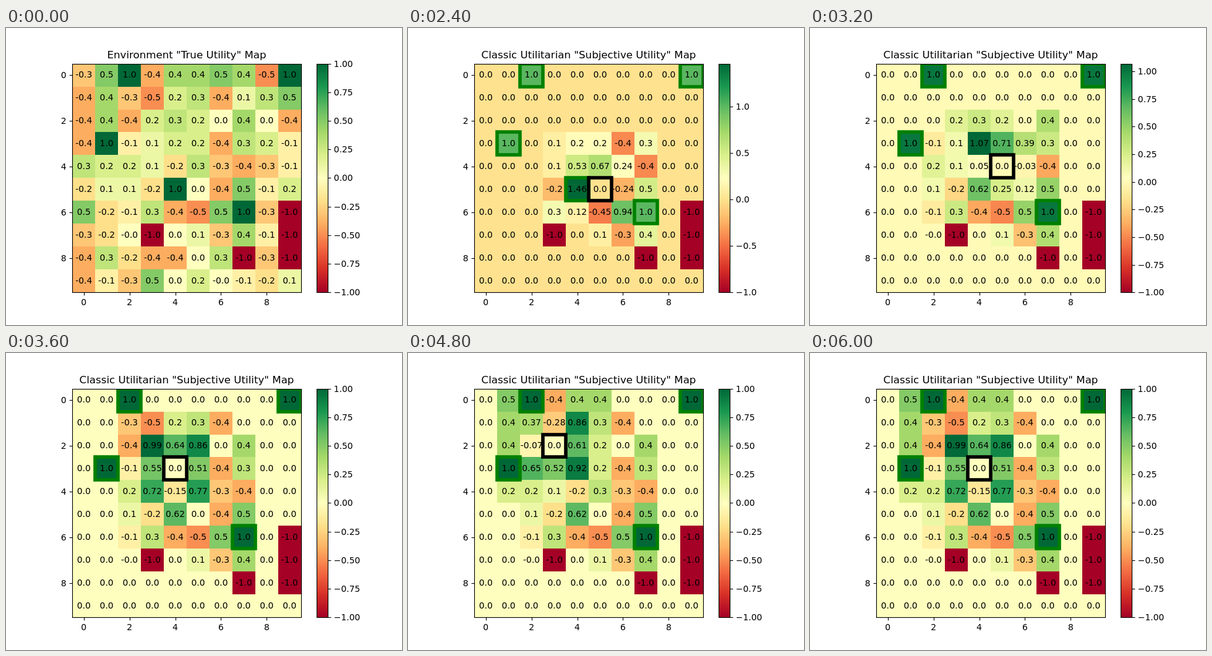
Recreate the animation shown at these times as an HTML page with a canvas. Size 640 px wide and 480 px high, loop 6.4 s.

```html
<!DOCTYPE html>
<html lang="en">
<head>
<meta charset="utf-8">
<title>Utility map</title>
<style>
  html, body { margin: 0; width: 100%; height: 100%; overflow: hidden; background: #fff; }
  canvas { display: block; }
</style>
</head>
<body>
<canvas id="stage" width="640" height="480"></canvas>
<script>
const ctx = document.getElementById('stage').getContext('2d');
const LEFT = 107.2, TOP = 57.6, SIZE = 369.6, CELL = SIZE / 10;
const BAR_LEFT = 502, BAR_RIGHT = 520;
const INTRO = 2000, STEP = 400, LOOP = 6400;

// Utility of every cell, in tenths
const truth = `
  -3 5 10 -4 4 4 5 4 -5 10
  -4 4 -3 -5 2 3 -4 1 3 5
  -4 4 -4 2 3 2 0 4 0 -4
  -4 10 -1 1 2 2 -4 3 2 -1
  3 2 2 1 -2 3 -3 -4 -3 -1
  -2 1 1 -2 10 0 -4 5 -1 2
  5 -2 -1 3 -4 -5 5 10 -3 -10
  -3 -2 -0 -10 0 1 -3 4 -1 -10
  -4 3 -2 -4 -4 0 3 -10 -3 -10
  -4 -1 -3 5 0 2 -0 -1 -2 1`.trim().split('\n')
  .map(line => line.trim().split(' ').map(n => Number(n) / 10));

// Agent position and the worth of its eight neighbours, row by row
const start = { row: 5, col: 5, worth: [] };
const think = { row: 5, col: 5, worth: [.53, .67, .24, 1.46, -.24, .12, -.45, .94] };
const eat = { row: 5, col: 4, worth: [.9, .25, 1.03, .15, .27, .8, -.25, -.08] };
const climb = { row: 4, col: 5, worth: [1.07, .71, .39, .05, -.03, .62, .25, .12] };
const low = { row: 3, col: 4, worth: [.99, .64, .86, .55, .51, .72, -.15, .77] };
const high = { row: 2, col: 3, worth: [.37, -.28, .86, -.07, .61, .65, .52, .92] };
const path = [start, think, eat, climb, low, high, low, high, low, high, low];
const EATEN = { row: 5, col: 4, rest: .62, since: path.indexOf(eat) };

const stops = 'a50026 d73027 f46d43 fdae61 fee08b ffffbf d9ef8b a6d96a 66bd63 1a9850 006837'
  .split(' ').map(hex => [0, 2, 4].map(i => parseInt(hex.slice(i, i + 2), 16)));

function colour(t) {
  const level = Math.max(0, Math.min(255, Math.floor(t * 256))) / 255 * 10;
  const i = Math.min(9, Math.floor(level));
  const mix = stops[i].map((c, k) => Math.round(c + (stops[i + 1][k] - c) * (level - i)));
  return `rgb(${mix})`;
}

const edgeX = col => Math.round(LEFT + CELL * col);
const edgeY = row => Math.round(TOP + CELL * row);
const near = (cell, row, col, reach) =>
  Math.abs(cell.row - row) <= reach && Math.abs(cell.col - col) <= reach;

function format(v) {
  const hundredths = Math.round(v * 100);
  const sign = Object.is(v, -0) ? '-' : '';
  return sign + v.toFixed(hundredths % 10 ? 2 : 1);
}

function valuesAt(index) {
  const seen = path.slice(0, index + 1), agent = path[index];
  const values = truth.map((line, row) => line.map((v, col) =>
    Math.abs(v) === 1 || seen.some(p => near(p, row, col, 2)) ? v : 0));
  if (index >= EATEN.since) values[EATEN.row][EATEN.col] = EATEN.rest;
  agent.worth.forEach((v, i) => {
    const k = i < 4 ? i : i + 1;
    values[agent.row + Math.floor(k / 3) - 1][agent.col + k % 3 - 1] = v;
  });
  values[agent.row][agent.col] = 0;
  return values;
}

function text(str, x, y, align, size = 13.889) {
  ctx.font = `${size}px "DejaVu Sans", sans-serif`;
  ctx.textAlign = align;
  ctx.fillStyle = '#000';
  ctx.fillText(str, x, y);
}

function line(x1, y1, x2, y2) {
  ctx.beginPath();
  ctx.moveTo(x1, y1);
  ctx.lineTo(x2, y2);
  ctx.stroke();
}

function frameCell(row, col, stroke) {
  const x = edgeX(col), y = edgeY(row);
  ctx.strokeStyle = stroke;
  ctx.lineWidth = 5.556;
  ctx.strokeRect(x, y, edgeX(col + 1) - x, edgeY(row + 1) - y);
}

function drawCells(values, max) {
  values.forEach((cells, row) => cells.forEach((v, col) => {
    const x = edgeX(col), y = edgeY(row);
    ctx.fillStyle = colour((v + 1) / (max + 1));
    ctx.fillRect(x, y, edgeX(col + 1) - x, edgeY(row + 1) - y);
  }));
}

function drawMarks(index) {
  const agent = path[index];
  ctx.save();
  ctx.beginPath();
  ctx.rect(107, 58, 370, 369);
  ctx.clip();
  truth.forEach((cells, row) => cells.forEach((v, col) => {
    const gone = index >= EATEN.since && row === EATEN.row && col === EATEN.col;
    if (v === 1 && !gone) frameCell(row, col, '#008000');
  }));
  frameCell(agent.row, agent.col, '#000');
  ctx.restore();
}

function drawAxes() {
  ctx.strokeStyle = '#000';
  ctx.lineWidth = 1.111;
  ctx.strokeRect(107.5, 58.5, 370, 369);
  for (let n = 0; n < 10; n += 2) {
    const x = LEFT + CELL * (n + .5), y = TOP + CELL * (n + .5);
    const tickX = Math.round(x) + .5, tickY = Math.round(y) + .5;
    line(tickX, 427.5, tickX, 432.4);
    line(102.6, tickY, 107.5, tickY);
    text(n, x, 448, 'center');
    text(n, 97.5, Math.round(y + 5), 'right');
  }
}

function drawBar(max) {
  for (let y = 58; y < 427; y++) {
    ctx.fillStyle = colour((TOP + SIZE - y - .5) / SIZE);
    ctx.fillRect(BAR_LEFT, y, BAR_RIGHT - BAR_LEFT, 1);
  }
  ctx.strokeStyle = '#000';
  ctx.lineWidth = 1.111;
  ctx.strokeRect(BAR_LEFT + .5, 58.5, BAR_RIGHT - BAR_LEFT, 369);
  const coarse = max > 1.25, step = coarse ? .5 : .25;
  for (let v = -1; v <= max; v += step) {
    const y = TOP + SIZE * (max - v) / (max + 1), tickY = Math.round(y) + .5;
    line(520.5, tickY, 525.4, tickY);
    text(v.toFixed(coarse ? 1 : 2).replace('-', '\u2212'), 529.8, Math.round(y + 5), 'left');
  }
}

function draw(index) {
  const intro = index < 0;
  const values = intro ? truth : valuesAt(index);
  const max = Math.max(...values.flat());
  ctx.fillStyle = '#fff';
  ctx.fillRect(0, 0, 640, 480);
  drawCells(values, max);
  if (!intro) drawMarks(index);
  drawAxes();
  drawBar(max);
  values.forEach((cells, row) => cells.forEach((v, col) =>
    text(format(v), LEFT + CELL * (col + .5), Math.round(TOP + CELL * (row + .5) + 4), 'center')));
  const title = intro ? 'Environment "True Utility" Map' : 'Classic Utilitarian "Subjective Utility" Map';
  text(title, LEFT + SIZE / 2, 49, 'center', 16.667);
}

let shown = null;
const begin = performance.now();

function tick() {
  const time = (performance.now() - begin) % LOOP;
  const index = time < INTRO ? -1 : Math.floor((time - INTRO) / STEP);
  if (index !== shown) draw(shown = index);
  requestAnimationFrame(tick);
}
tick();
</script>
</body>
</html>
```
